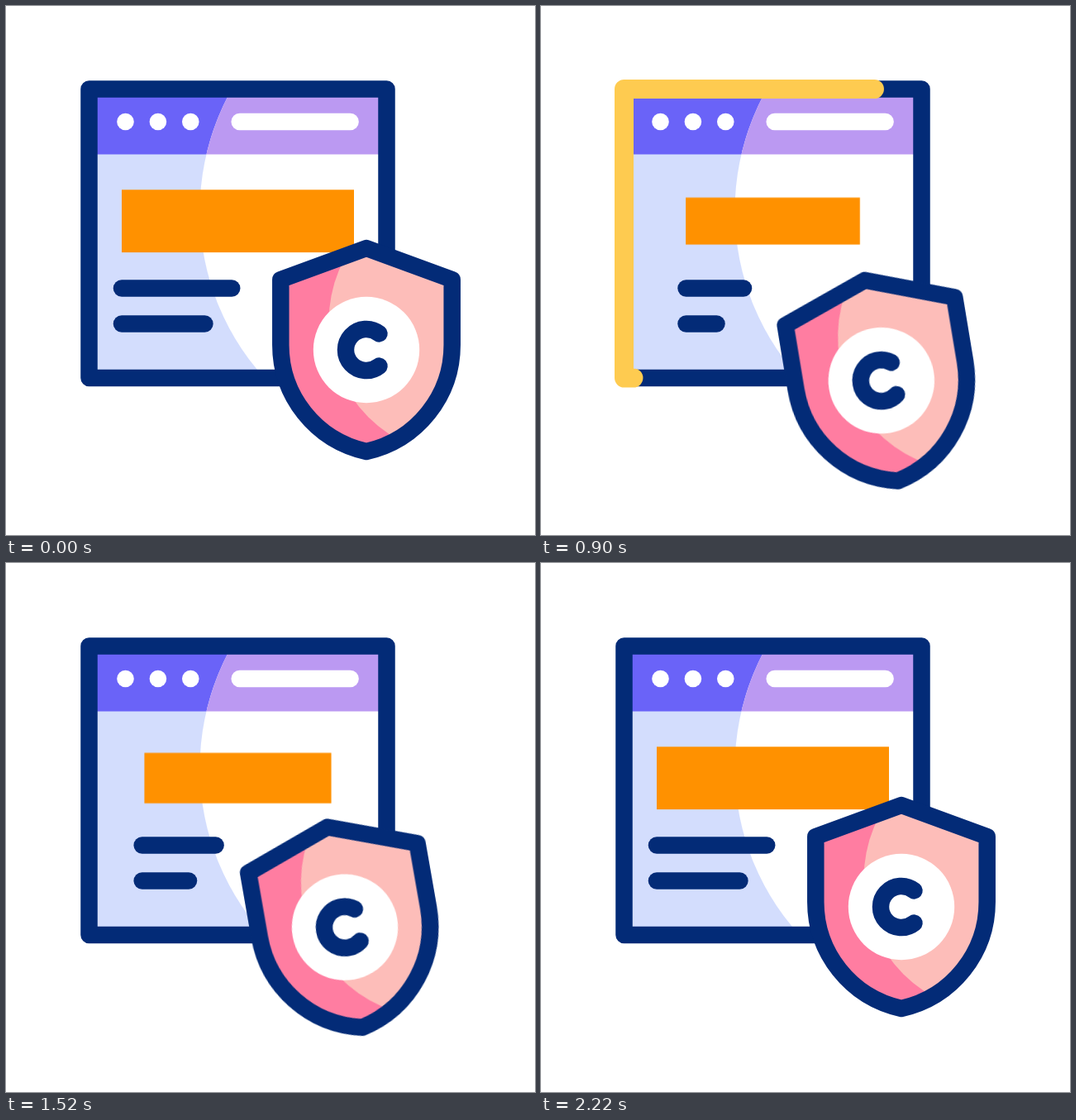
Animation, 640 px wide and 640 px high, one loop 2.4 s. Source, as an HTML page:

```html
<!DOCTYPE html>
<html lang="en">
<head>
<meta charset="utf-8">
<title>Protected page</title>
<style>
  @property --head { syntax: "<length>"; inherits: false; initial-value: 0px; }
  @property --tail { syntax: "<length>"; inherits: false; initial-value: 0px; }

  html, body { margin: 0; width: 100%; height: 100%; overflow: hidden; background: #fff; }
  svg { display: block; width: 100vw; height: 100vh; }

  .line { fill: none; stroke: #032b77; stroke-width: 20.5; stroke-linecap: round; stroke-linejoin: round; }
  .white { stroke: #fff; }

  .bar, .row, .runner, .shield {
    animation: 2400ms cubic-bezier(.3333, 0, .6667, 1) infinite;
  }

  .bar { transform-origin: 280.5px 260.2px; animation-name: shrink; }
  @keyframes shrink {
    0%, 8.3333% { transform: scale(1); }
    25%, 58.3333% { transform: scale(.75); }
    75%, 100% { transform: scale(1); }
  }

  .row { animation-name: trim; }
  .long { --full: 133.2px; --short: 69.5px; }
  .brief { --full: 100.4px; --short: 37px; }
  @keyframes trim {
    0%, 8.3333% { stroke-dasharray: var(--full) 400px; stroke-dashoffset: 0px; }
    25%, 58.3333% { stroke-dasharray: var(--short) 400px; stroke-dashoffset: -35.5px; }
    72.0833%, 100% { stroke-dasharray: var(--full) 400px; stroke-dashoffset: 0px; }
  }

  /* Both ends of the highlight run once round the frame, 400 ms apart. */
  .runner {
    stroke: #fecb50;
    stroke-width: 23;
    stroke-dasharray: calc(var(--head) - var(--tail)) 3000px;
    stroke-dashoffset: calc(0px - var(--tail));
    animation-name: head, tail, show;
  }
  @keyframes head {
    0%, 8.3333% { --head: 0px; }
    58.3333%, 100% { --head: 1419px; }
  }
  @keyframes tail {
    0%, 25% { --tail: 0px; }
    75%, 100% { --tail: 1419px; }
  }
  @keyframes show {
    0%, 8.34% { opacity: 0; }
    8.341%, 74.9% { opacity: 1; }
    74.901%, 100% { opacity: 0; }
  }

  .shield { transform-origin: 436px 416px; animation-name: hop, sway; }
  @keyframes hop {
    0%, 29.1667% { translate: 0 0; }
    39.1667% { translate: -26px 40px; }
    49.1667% { translate: -26px 0; }
    59.1667% { translate: -26px 40px; }
    69.1667% { translate: -26px 0; }
    79.1667% { translate: -26px 40px; }
    91.6667%, 100% { translate: 0 0; }
  }
  @keyframes sway {
    0%, 29.1667% { rotate: 0deg; }
    36.1111% { rotate: -10deg; }
    50% { rotate: 10deg; }
    63.8889% { rotate: -10deg; }
    77.7778% { rotate: 10deg; }
    91.6667%, 100% { rotate: 0deg; }
  }
</style>
</head>
<body>
<svg viewBox="0 0 640 640">
  <defs>
    <path id="crest" d="M436 293L539.7 331V410C539.7 471 498 525 436 539C374 525 332.3 471 332.3 410V331Z"/>
    <clipPath id="page"><rect x="100.5" y="100.5" width="360" height="349.5"/></clipPath>
    <clipPath id="inside"><use href="#crest"/></clipPath>
    <clipPath id="round"><circle cx="534.5" cy="248" r="300"/></clipPath>
  </defs>

  <g clip-path="url(#page)">
    <rect x="100" y="100" width="361" height="351" fill="#d3ddfd"/>
    <rect x="100" y="100" width="361" height="79.5" fill="#6a63f8"/>
    <g clip-path="url(#round)">
      <rect x="100" y="100" width="361" height="351" fill="#fff"/>
      <rect x="100" y="100" width="361" height="79.5" fill="#bb99f2"/>
    </g>
  </g>
  <g fill="#fff">
    <circle cx="144.5" cy="140" r="10.3"/>
    <circle cx="183.9" cy="140" r="10.3"/>
    <circle cx="223.3" cy="140" r="10.3"/>
  </g>
  <path class="line white" d="M282.7 140H416.6"/>

  <path class="line" d="M100.5 100.5H460.5V450H100.5Z"/>
  <rect class="bar" x="140" y="222.3" width="281" height="75.8" fill="#ff9100"/>
  <path class="line row long" d="M140 341.5H273.2"/>
  <path class="line row brief" d="M140 384.5H240.4"/>
  <path class="line runner" d="M335 450H100.5V100.5H460.5V450H335"/>

  <g class="shield">
    <g clip-path="url(#inside)">
      <rect x="320" y="280" width="232" height="272" fill="#ff7da1"/>
      <circle cx="553.5" cy="382" r="163" fill="#fdbdb9"/>
    </g>
    <use href="#crest" class="line"/>
    <circle cx="436" cy="416" r="64.2" fill="#fff"/>
    <path class="line" d="M451.5 396.4A25 25 0 1 0 451.5 435.6"/>
  </g>
</svg>
</body>
</html>
```
